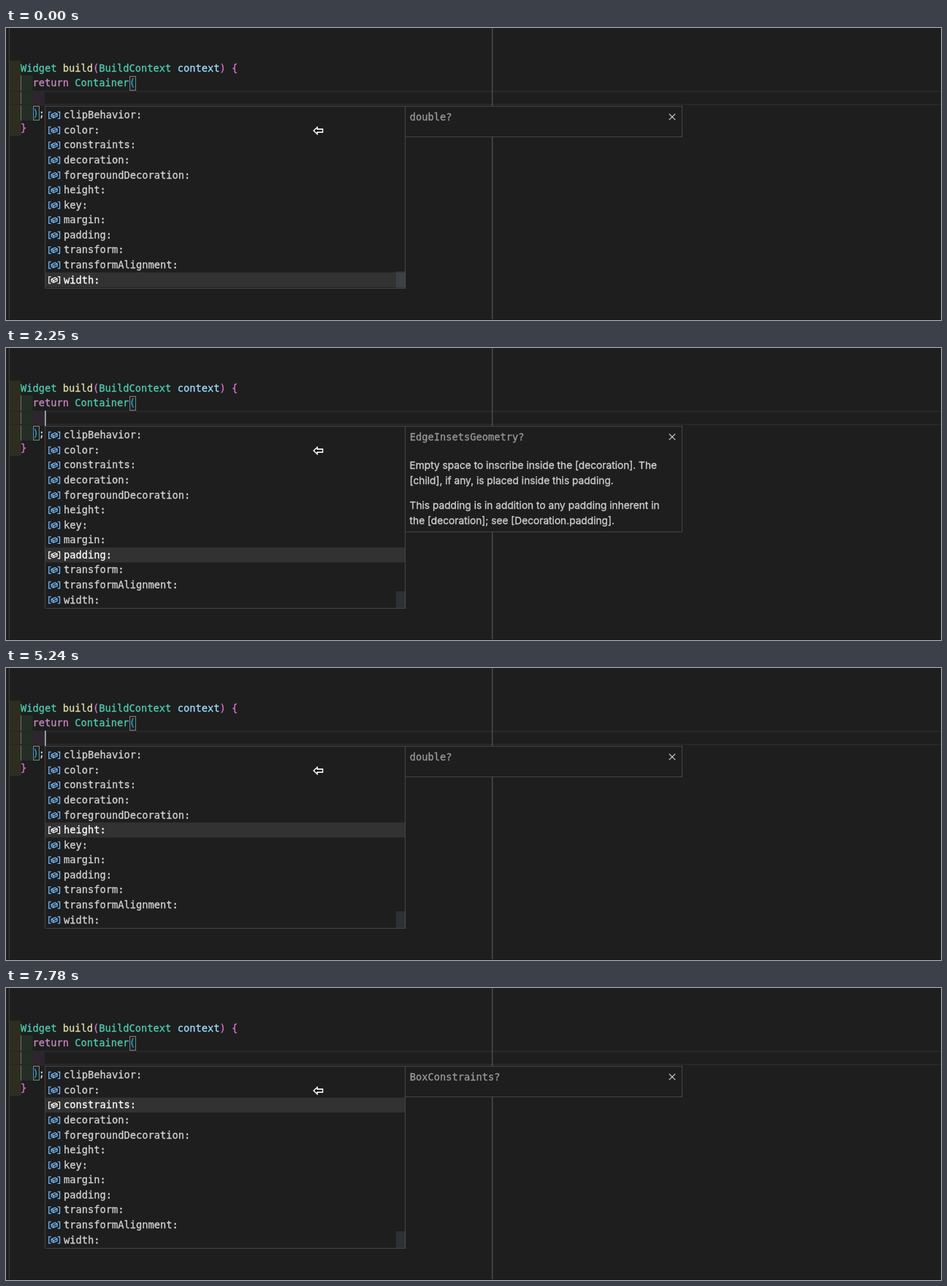
These frames come from a looping animation (1280 px wide and 401 px high, 8000 ms). An HTML page with a canvas:

```html
<!DOCTYPE html>
<html lang="en">
<head>
<meta charset="utf-8">
<title>Editor suggestions</title>
<style>
  html, body { margin: 0; width: 100%; height: 100%; overflow: hidden; background: #1e1e1e; }
  canvas { display: block; }
</style>
</head>
<body>
<canvas id="stage" width="1280" height="401"></canvas>
<script>
const ctx = document.getElementById('stage').getContext('2d');

const LOOP = 8000;
const LINE = 144 / 7;
const CHAR = 8.257;
const PARAGRAPH = 34.3;
const CODE_X = 20;
const CODE_TOP = 44.8;
const LIST_TOP = 109.3;
const MONO = '13.714px "DejaVu Sans Mono", monospace';
const SANS = '13.714px Inter, sans-serif';
const BG = '#1e1e1e';
const BORDER = '#454545';

const color = {
  type: '#4ec9b0', call: '#dcdcaa', variable: '#9cdcfe', keyword: '#c586c0',
  outer: '#da70d6', inner: '#179fff', plain: '#d4d4d4'
};

// Each token: line, column, text, colour
const code = [
  [0, 0, 'Widget', color.type], [0, 7, 'build', color.call], [0, 12, '(', color.outer],
  [0, 13, 'BuildContext', color.type], [0, 26, 'context', color.variable],
  [0, 33, ')', color.outer], [0, 35, '{', color.outer],
  [1, 2, 'return', color.keyword], [1, 9, 'Container', color.type], [1, 18, '(', color.inner],
  [3, 2, ')', color.inner], [3, 3, ';', color.plain],
  [4, 0, '}', color.outer]
];

const items = ['clipBehavior', 'color', 'constraints', 'decoration', 'foregroundDecoration',
  'height', 'key', 'margin', 'padding', 'transform', 'transformAlignment', 'width'];

// Paragraphs are arrays of lines; a line starting with "*" is a bullet.
const docs = {
  constraints: { type: 'BoxConstraints?', text: [] },
  decoration: { type: 'Decoration?', text: [
    ['The decoration to paint behind the [child].'],
    ['Use the [color] property to specify a simple solid color.'],
    ['The [child] is not clipped to the decoration. To clip a',
      'child to the shape of a particular [ShapeDecoration],',
      'consider using a [ClipPath] widget.']] },
  foregroundDecoration: { type: 'Decoration?', text: [
    ['The decoration to paint in front of the [child].']] },
  height: { type: 'double?', text: [] },
  key: { type: 'Key?', text: [] },
  margin: { type: 'EdgeInsetsGeometry?', text: [
    ['Empty space to surround the [decoration] and [child].']] },
  padding: { type: 'EdgeInsetsGeometry?', text: [
    ['Empty space to inscribe inside the [decoration]. The',
      '[child], if any, is placed inside this padding.'],
    ['This padding is in addition to any padding inherent in',
      'the [decoration]; see [Decoration.padding].']] },
  transform: { type: 'Matrix4?', text: [
    ['The transformation matrix to apply before painting the', 'container.']] },
  transformAlignment: { type: 'AlignmentGeometry?', text: [
    ['The alignment of the origin, relative to the size of the',
      'container, if [transform] is specified.'],
    ['When [transform] is null, the value of this property is', 'ignored.'],
    ['See also:'],
    ['*[Transform.alignment], which is set by this property.']] },
  width: { type: 'double?', text: [] }
};

// Times at which the selection moves up one row, and at which the caret toggles
const moves = [150, 1050, 1950, 2700, 3890, 4640, 5540, 6430, 7330];
const blinks = [300, 750, 1350, 1800, 2250, 2850, 3290, 3740, 4340, 4790,
  5240, 5830, 6280, 6730, 7330, 7780];

const passed = (times, t) => times.filter(time => time <= t).length;

function rect(x, y, w, h, fill) {
  ctx.fillStyle = fill;
  ctx.fillRect(x, y, w, h);
}

// A hairline outline gives the glyphs the slightly heavier weight of the editor.
function text(str, x, y, font, fill) {
  ctx.font = font;
  ctx.fillStyle = ctx.strokeStyle = fill;
  ctx.lineWidth = 0.3;
  ctx.lineJoin = 'round';
  ctx.fillText(str, x, y);
  ctx.strokeText(str, x, y);
  ctx.lineJoin = 'miter';
}

function box(x, y, w, h, stroke, fill) {
  rect(x, y, w, h, fill);
  ctx.strokeStyle = stroke;
  ctx.lineWidth = 1;
  ctx.strokeRect(x + 0.5, y + 0.5, w - 1, h - 1);
}

function line(points, closed) {
  ctx.beginPath();
  points.forEach(([x, y]) => ctx.lineTo(x, y));
  if (closed) ctx.closePath();
  ctx.stroke();
}

const lineTop = n => Math.round(CODE_TOP + n * LINE);

function drawEditor(caretOn) {
  rect(0, 0, 1280, 401, BG);
  const indent = 2 * CHAR;
  const band = (x, from, to, fill) => rect(x, lineTop(from), indent, lineTop(to) - lineTop(from), fill);
  band(CODE_X - 16, 0, 5, 'rgba(255,255,64,.07)');
  band(CODE_X, 1, 4, 'rgba(127,255,127,.07)');
  band(CODE_X + indent, 2, 3, 'rgba(255,127,255,.07)');

  rect(4, 0, 1, 401, '#404040');
  rect(20, lineTop(1), 1, lineTop(4) - lineTop(1), '#707070');
  rect(5, 86, 1275, 2, '#282828');
  rect(5, 104, 1275, 2, '#282828');
  rect(665.2, 0, 1.14, 401, '#5a5a5a');
  rect(0, 400, 1280, 1, '#191919');

  box(169, 66, 9, 20, '#808080', 'rgba(0,100,0,.1)');
  box(37, 107, 9, 20, '#808080', 'rgba(0,100,0,.1)');
  for (const [row, column, str, fill] of code) {
    text(str, CODE_X + column * CHAR, CODE_TOP + 15 + row * LINE, MONO, fill);
  }
  if (caretOn) rect(53, 86, 1.7, 21, '#aeafad');
}

function drawIcon(x, y, stroke) {
  ctx.save();
  ctx.translate(x, y);
  ctx.scale(8 / 7, 8 / 7);
  ctx.strokeStyle = stroke;
  ctx.lineWidth = 1.05;
  line([[4, 4.5], [1.5, 4.5], [1.5, 12.5], [4, 12.5]]);
  line([[12, 4.5], [14.5, 4.5], [14.5, 12.5], [12, 12.5]]);
  line([[4.5, 7.5], [9, 5.5], [11.5, 7], [11.5, 9.5], [7, 11.5], [4.5, 10]], true);
  line([[4.5, 7.5], [7, 9], [11.5, 7]]);
  line([[7, 9], [7, 11.5]]);
  ctx.restore();
}

function drawList(selected) {
  box(53, 107, 494, 251, BORDER, BG);
  items.forEach((name, i) => {
    const top = LIST_TOP + i * LINE;
    const active = i === selected;
    if (active) rect(54, top, 492, LINE, '#323233');
    drawIcon(57, top + 0.9, active ? '#fff' : '#75beff');
    text(name + ':', 79, top + 15, MONO, active ? '#fff' : color.plain);
  });
  rect(534, 334, 13, 23, 'rgba(105,125,145,.2)');
}

function drawDoc({ type, text: paragraphs }) {
  const entries = [];
  let y = 166.2;
  let bottom = 150;
  for (const paragraph of paragraphs) {
    paragraph.forEach((str, i) => entries.push({ str, y: y + i * LINE }));
    const last = y + (paragraph.length - 1) * LINE;
    bottom = Math.round(last + (paragraph[0][0] === '*' ? 25 : 11));
    y = last + PARAGRAPH;
  }

  box(546, 107, 380, bottom - 107, BORDER, BG);
  text(type, 552.8, 127, MONO, '#999');
  ctx.strokeStyle = '#d0d0d0';
  ctx.lineWidth = 1.2;
  line([[907.8, 117.8], [916.2, 126.2]]);
  line([[916.2, 117.8], [907.8, 126.2]]);

  for (const entry of entries) {
    const bullet = entry.str[0] === '*';
    text(bullet ? entry.str.slice(1) : entry.str, bullet ? 576 : 552.6, entry.y, SANS, '#d0d0d0');
    if (bullet) {
      ctx.beginPath();
      ctx.arc(566, entry.y - 4.5, 2.3, 0, 2 * Math.PI);
      ctx.fill();
    }
  }
}

function drawPointer() {
  ctx.strokeStyle = '#fff';
  ctx.fillStyle = '#000';
  ctx.lineWidth = 1.3;
  line([[421.3, 141], [426, 136.6], [426, 139], [433.5, 139], [433.5, 143], [426, 143], [426, 145.4]], true);
  ctx.fill();
  ctx.stroke();
}

function draw(t) {
  const selected = items.length - 1 - passed(moves, t);
  drawEditor(passed(blinks, t) % 2 === 1);
  drawDoc(docs[items[selected]]);
  drawList(selected);
  drawPointer();
}

const start = performance.now();
function tick() {
  draw((performance.now() - start) % LOOP);
  requestAnimationFrame(tick);
}
tick();
</script>
</body>
</html>
```
